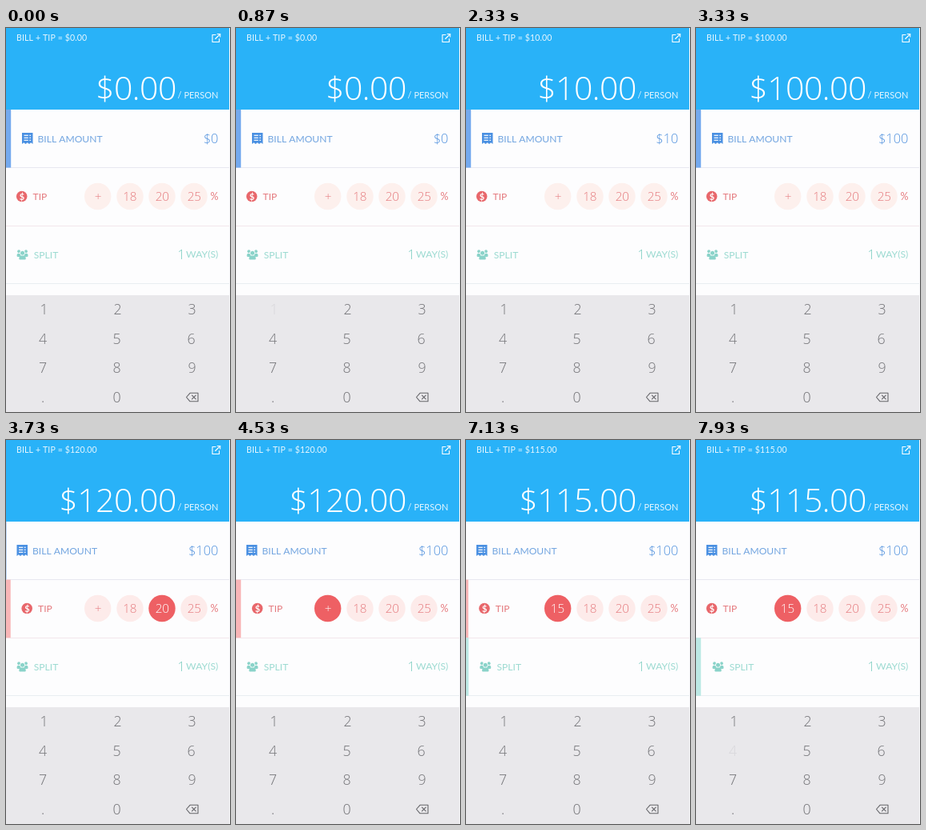
Recreate the animation shown at these times as an HTML page with a canvas. Size 280 px wide and 480 px high, loop 8000 ms.

```html
<!DOCTYPE html>
<html lang="en">
<head>
<meta charset="utf-8">
<title>Tip calculator</title>
<style>
html, body { margin: 0; width: 100%; height: 100%; overflow: hidden; background: #fdfdfe; }
canvas { display: block; width: 280px; height: 480px; }
</style>
</head>
<body>
<canvas id="stage"></canvas>
<script>
const W = 280, H = 480, LOOP = 8000;
const BLUE = '#4a90e2', RED = '#ee6064', MINT = '#8ad3c9';
const BLUE_TEXT = '#72a5e0', RED_TEXT = '#e57a7e', MINT_TEXT = '#9bdad1';
const LABEL = 'Lato, "Open Sans", sans-serif';
const DIGITS = '"Open Sans", "Noto Sans", sans-serif';
const canvas = document.getElementById('stage');
const ctx = canvas.getContext('2d');
const dpr = window.devicePixelRatio || 1;
canvas.width = W * dpr;
canvas.height = H * dpr;

// Key taps: [time, key]
const taps = [[870, '1'], [1870, '0'], [2470, '0'], [5340, '1'], [6140, '5'], [7880, '4']];
const RELEASE = 130, SLIDE = 300;
const toTip = 3480, toSplit = 6975, pick20 = 3480, pickCustom = 4270;

const clamp = v => Math.max(0, Math.min(1, v));
const ease = v => { v = clamp(v); return v * v * (3 - 2 * v); };
const ramp = (t, start, len = SLIDE) => ease((t - start) / len);

function typed(t, from, to) {
  return taps.filter(([at]) => at >= from && at < to && t >= at + RELEASE).map(k => k[1]).join('');
}

function keyAlpha(t, key) {
  let a = 1;
  for (const [at, k] of taps) {
    const d = t - at;
    if (k === key && d >= 0) a = Math.min(a, 0.14 + 0.86 * clamp((d - 110) / 220));
  }
  return a;
}

// Places text by its inked edge, so x is where the glyphs really begin or end.
function text(str, x, y, size, color, { side = 'left', weight = 400, gap = 0, font = LABEL } = {}) {
  ctx.font = `${weight} ${size}px ${font}`;
  ctx.letterSpacing = gap + 'px';
  ctx.textAlign = 'left';
  ctx.fillStyle = color;
  const m = ctx.measureText(str);
  const l = -m.actualBoundingBoxLeft, r = m.actualBoundingBoxRight;
  const shift = side === 'left' ? l : side === 'right' ? r : (l + r) / 2;
  ctx.fillText(str, x - shift, y);
}

const digits = (str, x, y, size, color, opts) =>
  text(str, x, y, size, color, { side: 'right', weight: 350, font: DIGITS, ...opts });

function rect(x, y, w, h, color) {
  ctx.fillStyle = color;
  ctx.fillRect(x, y, w, h);
}

function disc(x, y, r, color) {
  ctx.fillStyle = color;
  ctx.beginPath();
  ctx.arc(x, y, r, 0, Math.PI * 2);
  ctx.fill();
}

function line(points, color, width, close) {
  ctx.strokeStyle = color;
  ctx.lineWidth = width;
  ctx.lineJoin = ctx.lineCap = 'round';
  ctx.beginPath();
  points.forEach(([x, y]) => ctx.lineTo(x, y));
  if (close) ctx.closePath();
  ctx.stroke();
}

function shareIcon() {
  line([[262, 8.5], [258, 8.5], [258, 17.5], [266.5, 17.5], [266.5, 13.5]], '#fff', 1.1);
  line([[261.7, 13.5], [267.7, 7.5]], '#fff', 1.1);
  line([[264.2, 7.5], [267.7, 7.5], [267.7, 11]], '#fff', 1.1);
}

function receiptIcon(x, y) {
  ctx.fillStyle = BLUE;
  ctx.beginPath();
  ctx.moveTo(x, y);
  ctx.lineTo(x + 13.5, y);
  ctx.lineTo(x + 13.5, y + 14);
  for (let i = 1; i <= 6; i++) ctx.lineTo(x + 13.5 - i * 2.25, y + (i % 2 ? 12.3 : 14));
  ctx.fill();
  for (let i = 0; i < 3; i++) {
    rect(x + 2.5, y + 2.7 + i * 3, 5.3, 1.2, '#fff');
    rect(x + 9.3, y + 2.7 + i * 3, 1.8, 1.2, '#fff');
  }
}

function peopleIcon(x, y) {
  const body = (cx, top, w, h) => {
    ctx.beginPath();
    ctx.roundRect(cx - w / 2, top, w, h, [w / 2.4, w / 2.4, 1, 1]);
    ctx.fill();
  };
  for (const cx of [x + 2.8, x + 11.7]) {
    disc(cx, y + 2.2, 1.9, MINT);
    body(cx, y + 4.7, 5, 4.2);
  }
  disc(x + 7.25, y + 4.3, 3.2, '#fdfdfe');
  disc(x + 7.25, y + 4.3, 2.5, MINT);
  body(x + 7.25, y + 7.4, 8.4, 5.2);
}

function backspaceIcon() {
  line([[225.5, 461.5], [230, 456.3], [240, 456.3], [240, 466.8], [230, 466.8]], '#66666a', 1.1, true);
  line([[232.5, 459.1], [237.2, 463.9]], '#66666a', 1.1);
  line([[237.2, 459.1], [232.5, 463.9]], '#66666a', 1.1);
}

function chip(x, label, on, tint) {
  disc(x, 210.5, 16.7, tint);
  ctx.globalAlpha = on;
  disc(x, 210.5, 16.7, RED);
  ctx.globalAlpha = 1;
  digits(label, x, 215.9, 15.3, on > 0.5 ? '#fff' : RED_TEXT, { side: 'center' });
}

function draw(t) {
  const bill = +typed(t, 0, 4000);
  const custom = typed(t, 5000, 7000);
  const tip = custom ? +custom : t >= pick20 ? 20 : 0;
  const total = '$' + (bill * (1 + tip / 100)).toFixed(2);

  const tipIn = ramp(t, toTip), splitIn = ramp(t, toSplit);
  const active = [1 - tipIn, tipIn - splitIn, splitIn];
  const on20 = ramp(t, pick20, 150) - ramp(t, pickCustom, 150);
  const onCustom = ramp(t, pickCustom, 150);

  ctx.setTransform(dpr, 0, 0, dpr, 0, 0);
  rect(0, 0, W, H, '#fdfdfe');

  rect(0, 0, W, 102, '#29b2f8');
  text('BILL + TIP = ' + total, 13, 15.7, 10.6, '#e6f6fe', { gap: 0.1 });
  shareIcon();
  digits(total, 212, 89.5, 41, '#fff', { gap: -0.5 });
  text('/ PERSON', 265, 88.2, 11, '#e6f6fe', { side: 'right' });

  ['#e8e8f0', '#f3e7eb', '#e9eef1'].forEach((c, i) => rect(0, [174, 247, 319][i], W, 1, c));
  ['#74a9ee', '#f8b6b7', '#bce9e5'].forEach((c, i) => rect(0, 102 + i * 72.6, 6.2 * active[i], 72.6, c));

  const [bx, tx, sx] = active.map(a => a * 7);
  receiptIcon(13 + bx, 131);
  text('BILL AMOUNT', 33.5 + bx, 142.5, 12.1, BLUE_TEXT);
  digits('$' + bill, 265, 144, 16.4, '#5594de');

  disc(19.7 + tx, 210.5, 6.8, '#e8676b');
  text('$', 19.7 + tx, 214.5, 11, '#fff', { side: 'center', weight: 700 });
  text('TIP', 33.5 + tx, 214.9, 12.1, RED_TEXT);
  const tint = tipIn > 0.5 ? '#fdebea' : '#fdf0ed';
  chip(114.7, custom || '+', onCustom, tint);
  chip(155, '18', 0, tint);
  chip(195, '20', on20, tint);
  chip(235, '25', 0, tint);
  text('%', 265.5, 215.2, 12.5, RED_TEXT, { side: 'right' });

  peopleIcon(13.3 + sx, 277);
  text('SPLIT', 34.8 + sx, 287.5, 12.1, MINT_TEXT);
  digits('1', 220.5, 288.5, 16.4, '#74cabd');
  text('WAY(S)', 265, 287.3, 12.2, MINT_TEXT, { side: 'right' });

  rect(0, 334, W, H - 334, '#e9e8eb');
  ['1', '2', '3', '4', '5', '6', '7', '8', '9', '.', '0'].forEach((k, i) => {
    ctx.globalAlpha = keyAlpha(t, k);
    digits(k, 46 + (i % 3) * 93, 358 + Math.floor(i / 3) * 36.5, 17.8, '#747478', { side: 'center' });
    ctx.globalAlpha = 1;
  });
  backspaceIcon();
  rect(W - 1, 0, 1, H, '#f8f8fa');
}

const start = performance.now();
function frame() {
  draw((performance.now() - start) % LOOP);
  requestAnimationFrame(frame);
}
frame();
</script>
</body>
</html>
```
